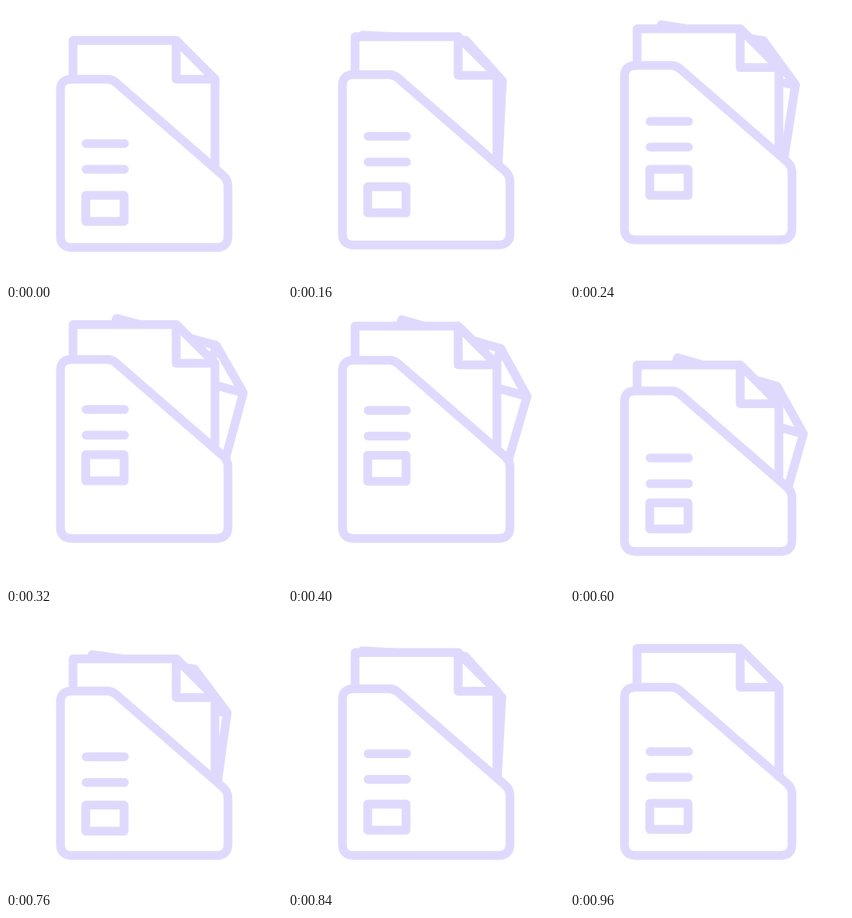
Animation of 360x360 px, one loop 1.48 s. Source, as an HTML page:

```html
<!DOCTYPE html>
<html lang="en">
<head>
<meta charset="utf-8">
<title>Folder</title>
<style>
  html, body { margin: 0; width: 100%; height: 100%; overflow: hidden; background: #fff; }
  svg { display: block; width: 100%; height: 100%; }
  path, rect { stroke: #dfdafd; stroke-width: 11.5; stroke-linecap: round; stroke-linejoin: round; fill: #fff; }
</style>
</head>
<body>
<svg viewBox="0 0 360 360">
  <defs>
    <!-- sheet with folded corner; its right corner is the origin -->
    <g id="sheet">
      <path d="M-185 140V-50.5H-50.5L0 0V140"/>
      <path d="M-50.5 -50.5V0H0Z"/>
    </g>
  </defs>
  <use id="back" href="#sheet"/>
  <use id="front" href="#sheet"/>
  <path id="holder"/>
  <path id="lines" d="M104.5 0H154.5M104.5 33.5H154.5"/>
  <rect id="label" x="104" y="-17" width="50" height="34"/>
</svg>
<script>
const LOOP = 1480, STEP = 40;
const $ = id => document.getElementById(id);

// values at rest, at the top of the jump and at the bottom of the landing
const poses = {
  rest: { front: 95.5, bx: 272.5, by: 95.5, turn: 0, top: 95.5, base: 315, lines: 179.5, label: 264 },
  high: { front: 67.5, bx: 312.3, by: 109, turn: 16.3, top: 62.3, base: 296.7, lines: 126, label: 201.5 },
  low: { front: 122.3, bx: 304.5, by: 162, turn: 16, top: 105.5, base: 315, lines: 193, label: 268.5 }
};

// start, end, from, to, skew of the sine ease
const moves = [
  [0, 360, 'rest', 'high', 1.58],
  [360, 590, 'high', 'low', 1],
  [590, 960, 'low', 'rest', 0.89],
  [960, LOOP, 'rest', 'rest', 1]
];

const ease = (u, skew) => (1 - Math.cos(Math.PI * Math.pow(u, skew))) / 2;

function poseAt(t) {
  const [start, end, from, to, skew] = moves.find(m => t < m[1]);
  const k = ease((t - start) / (end - start), skew);
  const a = poses[from], b = poses[to], out = {};
  for (const key in a) out[key] = a[key] + (b[key] - a[key]) * k;
  return out;
}

function holderPath(top, base) {
  return `M71 ${top + 14}Q71 ${top} 86 ${top}H132Q138 ${top} 143 ${top + 4}` +
    `L283 ${top + 125.5}Q289.5 ${top + 131} 289.5 ${top + 140}` +
    `V${base - 15}Q289.5 ${base} 274 ${base}H86Q71 ${base} 71 ${base - 15}Z`;
}

const place = (id, x, y, turn = 0) =>
  $(id).setAttribute('transform', `translate(${x} ${y}) rotate(${turn})`);

function draw(t) {
  const p = poseAt(t);
  place('back', p.bx, p.by, p.turn);
  place('front', 272.5, p.front);
  $('holder').setAttribute('d', holderPath(p.top, p.base));
  place('lines', 0, p.lines);
  place('label', 0, p.label);
}

const begin = performance.now();
function tick() {
  const t = (performance.now() - begin) % LOOP;
  draw(Math.floor(t / STEP) * STEP);
  requestAnimationFrame(tick);
}
tick();
</script>
</body>
</html>
```
